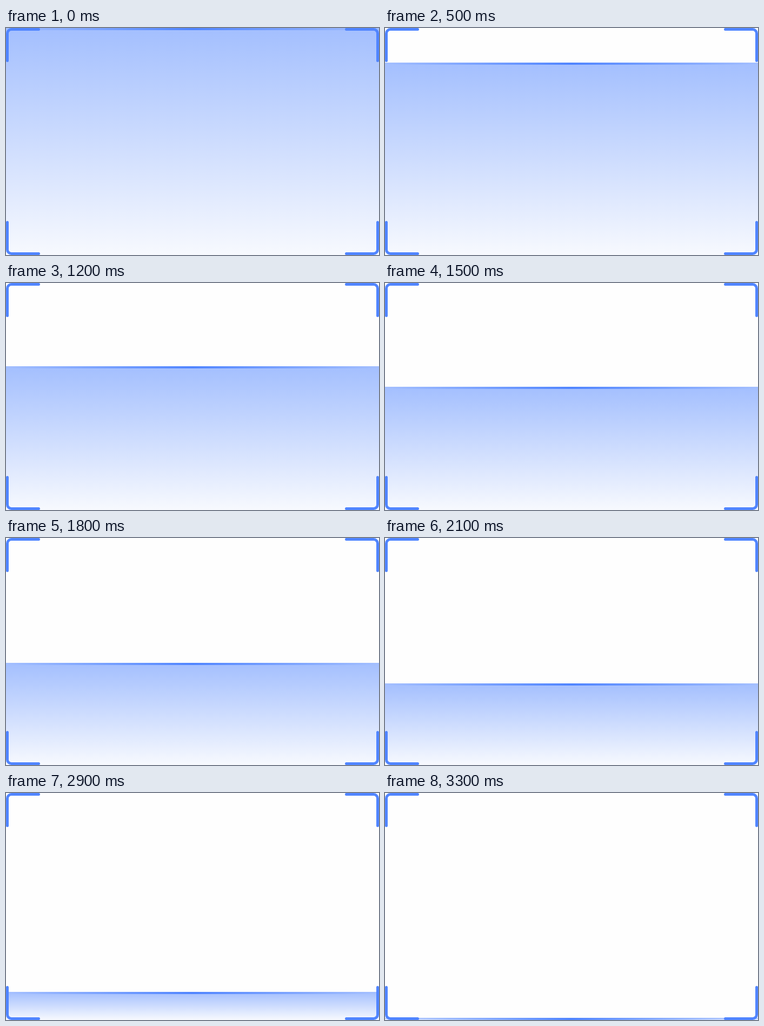
Write an HTML page that moves like this. It is 690x420 px and loops after 3.4 s.

```html
<!DOCTYPE html>
<html lang="en">
<head>
<meta charset="utf-8">
<title>Scan frame</title>
<style>
  html, body {
    margin: 0;
    width: 100%;
    height: 100%;
    overflow: hidden;
    background: #fefefe;
  }
  .stage {
    position: relative;
    width: 690px;
    height: 420px;
    overflow: hidden;
  }
  /* The veil hangs between the sweep line and the stage's bottom edge. */
  .veil {
    position: absolute;
    left: 0;
    right: 0;
    bottom: 0;
    top: 0;
    background: linear-gradient(rgb(80 133 255 / .52), rgb(80 133 255 / .04));
    animation: sweep 3400ms infinite;
  }
  .veil::before {
    content: "";
    position: absolute;
    left: 0;
    right: 0;
    top: 0;
    height: 4px;
    background: linear-gradient(90deg, #5085ff00, #5085ff, #5085ff00);
  }
  .corners {
    position: absolute;
    inset: 0;
    fill: none;
    stroke: #5085ff;
    stroke-width: 5;
    stroke-linecap: round;
  }
  /* One jump every 100 ms. */
  @keyframes sweep {
    0% { top: 0.48px; animation-timing-function: steps(21); }
    61.764% { top: 268.9px; animation-timing-function: steps(9); }
    88.235% { top: 380.6px; animation-timing-function: steps(3); }
    97.058%, 100% { top: 416px; }
  }
</style>
</head>
<body>
<div class="stage">
  <div class="veil"></div>
  <svg class="corners" width="690" height="420" viewBox="0 0 690 420">
    <defs>
      <path id="corner" d="M60.5 2.5H10A7.5 7.5 0 0 0 2.5 10V60.5"/>
    </defs>
    <use href="#corner"/>
    <use href="#corner" transform="translate(690 0) scale(-1 1)"/>
    <use href="#corner" transform="translate(0 420) scale(1 -1)"/>
    <use href="#corner" transform="translate(690 420) scale(-1 -1)"/>
  </svg>
</div>
</body>
</html>
```
